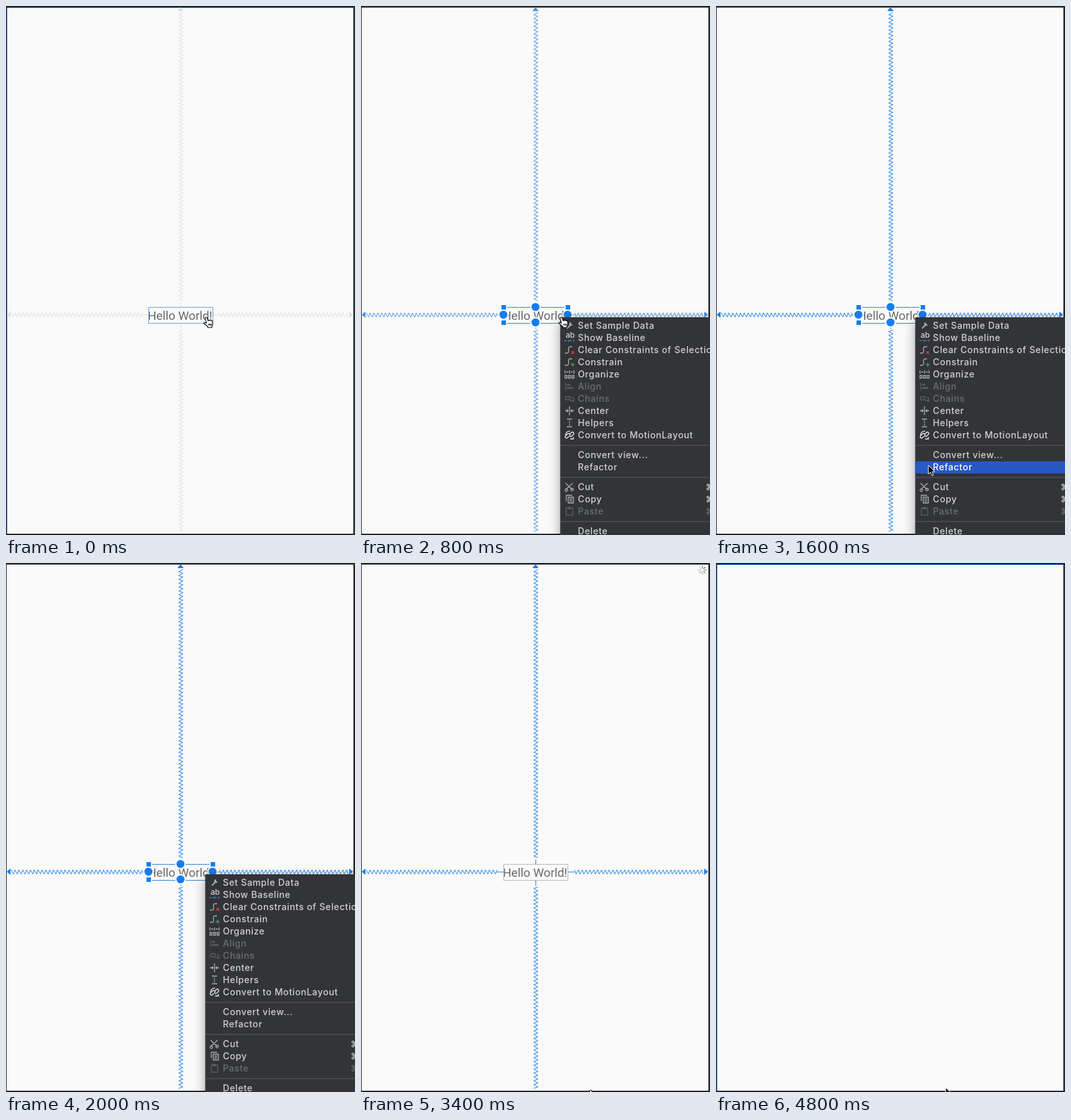
These frames come from a looping animation (544 by 826 pixels, 5 s). An HTML page:

```html
<!DOCTYPE html>
<html lang="en">
<head>
<meta charset="utf-8">
<title>Layout editor: delete a view</title>
<style>
  html, body { margin: 0; width: 100%; height: 100%; overflow: hidden; background: #242426; }
  svg { display: block; width: 544px; height: 826px; }
  .label { font: 18.67px Roboto, sans-serif; fill: #696969; }
  .item { font: 500 14px Inter, "DejaVu Sans", sans-serif; letter-spacing: .62px; fill: #d2d2d3; }
  .item path { fill: none; stroke: #adaeb0; stroke-width: 1.3; }
  .item .bar { fill: none; }
  .item.on .bar { fill: #2759c4; }
  .item.on { fill: #fff; }
  .item.off { fill: #6d6e70; }
  .item.off path { stroke: #5c5d60; }
  .menu { filter: drop-shadow(0 6px 9px rgba(0, 0, 0, .36)); }
</style>
</head>
<body>
<svg id="stage" viewBox="0 0 544 826"></svg>
<script>
const LOOP = 5000;
const BLUE = '#177cf2';
const stage = document.getElementById('stage');

function add(parent, tag, attrs = {}, text = '') {
  const el = document.createElementNS('http://www.w3.org/2000/svg', tag);
  for (const key in attrs) el.setAttribute(key, attrs[key]);
  el.textContent = text;
  parent.append(el);
  return el;
}
const group = (attrs, parent = stage) => add(parent, 'g', attrs);
const show = (el, on) => el.setAttribute('visibility', on ? 'visible' : 'hidden');

// Zigzag running outward from the view, starting on the given side of its axis.
function zigzag(from, to, mid, side, vertical) {
  const dir = Math.sign(to - from);
  const points = [];
  for (let i = 0; i * 3 <= Math.abs(to - from); i++) {
    const along = from + dir * (i * 3 - (i % 2 ? .7 : 0));
    const across = mid + 3.3 * (i % 2 ? -side : side);
    points.push(vertical ? [across, along] : [along, across]);
  }
  return 'M' + points.join('L');
}

// Canvas and its frame
add(stage, 'rect', { x: 1, y: 2.5, width: 540.5, height: 821.5, fill: '#fafafa' });
const frame = group({ 'stroke-width': 1 });
add(frame, 'path', { d: 'M1 2.5H542', stroke: '#1c6fc6' });
add(frame, 'path', { d: 'M1 2V824', stroke: '#0b2c7c', 'stroke-width': 1.4 });
add(frame, 'path', { d: 'M542 2V824', stroke: '#2b5560' });

// Constraint springs
const springs = group({});
add(springs, 'path', {
  d: zigzag(212, 8, 482.5, -1, false) + zigzag(333, 535, 482.5, -1, false) +
     zigzag(460, 8, 272.5, 1, true) + zigzag(506, 823, 272.5, 1, true) +
     'M212 482.5H222M323 482.5H333M272.5 463V470M272.5 496V504',
  fill: 'none', 'stroke-width': 1
});
add(springs, 'path', {
  d: 'M1 482l6-5v10zM541 482l-6-5v10zM272 2l-5 6h10z', stroke: 'none'
});

// View being edited
const view = group({});
add(view, 'rect', { x: 222, y: 470, width: 101, height: 26, fill: '#fafafa' });
add(view, 'text', { x: 221, y: 489.6, class: 'label' }, 'Hello World!');
const box = add(view, 'rect', {
  x: 222.5, y: 470.5, width: 100, height: 25, fill: 'none'
});

const handles = group({ fill: BLUE, stroke: '#fafafa', 'stroke-width': 2 });
for (const x of [222.5, 322.5])
  for (const y of [470.5, 494.5])
    add(handles, 'rect', { x: x - 4.5, y: y - 4.5, width: 9, height: 9 });
for (const [x, y] of [[222, 482], [322, 482], [272, 470], [272, 494]])
  add(handles, 'circle', { cx: x, cy: y, r: 7.2 });

// Context menu
const icons = {
  wrench: 'M-4 4.5L1.5-1M1-4.5L.5-1.5 1.5-.5 4.5-1M2-4.5L1-1.5',
  spline: 'M-7 5H-4C2 5-5-5 1-5H4',
  organize: 'M-7-6V-1M7-6V-1M0-6V-1M-5-3.5H-2M2-3.5H5M-7 2h3v4h-3zM-1.5 2h3v4h-3zM4 2h3v4h-3z',
  align: 'M-6-6V6M-4-3H1M-4-2H1M-4 3H6M-4 2H6',
  chains: 'M-1 2H-4A2.5 2.5 0 0 1-4-3H0A2.5 2.5 0 0 1 2 0M0-1A2.5 2.5 0 0 0 2 3H4A2.5 2.5 0 0 0 4-2M4 4H8',
  center: 'M0-7V7M-7 0H-2M2 0H7M-4-2L-2 0-4 2M4-2L2 0 4 2',
  helpers: 'M-4-6H4M-4 6H4M0-4V-2M0-1V1M0 2V4',
  convert: 'M-6 0A6 6 0 0 1 1-6M-1 2L-3 4A2 2 0 0 1-6 1L-3-2A2 2 0 0 1 0 1M0-1L3-4A2 2 0 0 1 6-1L3 2A2 2 0 0 1 0 1M1 6H6V3',
  cut: 'M-6-6L4 4M-6 4L5-6M-5 3a2 2 0 1 0 .1 0M4 2a2 2 0 1 0 .1 0',
  copy: 'M-5 3V-6H4M-2-3H6V6H-2zM0 0H4M0 3H4',
  paste: 'M-5-5H5V6H-5zM-2-6H2V-4H-2z'
};
const items = [
  [499, 'Set Sample Data', 'wrench'], [518, 'Show Baseline', 'baseline'],
  [537, 'Clear Constraints of Selection', 'spline', '#d9434e'],
  [556, 'Constrain', 'spline', '#4da253'], [575, 'Organize', 'organize'],
  [594, 'Align', 'align'], [613, 'Chains', 'chains'], [632, 'Center', 'center'],
  [651, 'Helpers', 'helpers'], [670, 'Convert to MotionLayout', 'convert'],
  [701, 'Convert view...'], [720, 'Refactor'],
  [751, 'Cut', 'cut'], [770, 'Copy', 'copy'], [789, 'Paste', 'paste'], [820, 'Delete']
];
const disabled = ['Align', 'Chains', 'Paste'];
const shortcuts = ['Cut', 'Copy', 'Paste'];

const menu = group({});
add(menu, 'rect', { x: 310.5, y: 486, width: 300, height: 400, fill: '#333437', class: 'menu' });
for (const y of [686, 736, 805])
  add(menu, 'path', { d: `M311 ${y}H544`, stroke: '#505154', 'stroke-width': 1.6 });

const rows = {};
for (const [y, name, icon, accent] of items) {
  const base = disabled.includes(name) ? 'item off' : 'item';
  const row = group({ class: base, transform: `translate(325 ${y})` }, menu);
  add(row, 'rect', { class: 'bar', x: -14.5, y: -9, width: 240, height: 19 });
  if (icon === 'baseline') {
    add(row, 'text', { x: -6, y: 0, style: 'font-size:12px;letter-spacing:0' }, 'ab');
    add(row, 'path', { d: 'M-8 4.5H-5M-3 4.5H3M5 4.5H8', style: 'stroke:#3e86c4' });
  } else if (icon) {
    const mark = add(row, 'path', { d: icons[icon] });
    if (icon === 'convert') mark.style.stroke = '#f0f0f0';
    if (icon === 'wrench') mark.style.strokeWidth = 2;
  }
  if (accent) {
    const cross = name === 'Constrain' ? 'M2 4H8M5 1V7' : 'M3 2L7 6M7 2L3 6';
    add(row, 'path', { d: cross, style: `stroke:${accent}` });
  }
  add(row, 'text', { x: 13, y: 5 }, name);
  if (shortcuts.includes(name)) add(row, 'text', { x: 212, y: 5 }, '⌘');
  rows[name] = { row, base };
}

// Busy spinner
const spinner = group({ 'stroke-width': 1.5, 'stroke-linecap': 'round' });
for (let i = 0; i < 8; i++)
  add(spinner, 'path', {
    d: 'M0-3V-6.2', transform: `rotate(${i * 45})`,
    stroke: `hsl(0 0% ${52 + i * 4}%)`
  });

// Pointers, hot spot at the origin
const cursors = {
  arrow: add(stage, 'path', {
    d: 'M0 0V14L3.2 11 5.5 16.2 7.9 15.2 5.7 10.2H10Z',
    fill: '#000', stroke: '#fff', 'stroke-width': 1
  }),
  hand: add(stage, 'path', {
    d: 'M-1.7 1.2Q0-1.2 1.5 1L3 5.5Q4.5 3.8 5.5 5.3 7 4 8 5.5 9.6 4.8 10 7L10.2 11Q10 13 9 14V16H2.5V14.5L-3.5 9.5Q-4 7.4-1.5 8.2L.4 9.2Z' +
       'M4.2 10V13M6.1 10V13M8 10V13',
    fill: '#fff', stroke: '#000', 'stroke-width': 1.1, 'stroke-linejoin': 'round'
  })
};

// Each step changes only what it names.
const steps = [
  [0, { spring: '#dfdfdf', frame: true, box: '#6a9fd6', view: true, handles: false,
        menu: false, row: '', spin: null, cursor: ['hand', 312, 486] }],
  [200, { spring: '#b6c9e2', frame: false, box: '#2d80dc', handles: true }],
  [400, { spring: '#80a6d6', menu: true }],
  [600, { spring: '#689edc' }],
  [800, { spring: '#4a93e3' }],
  [1000, { spring: '#3088ea', row: 'Show Baseline', cursor: ['arrow', 318, 512] }],
  [1200, { spring: '#1c7eec', row: 'Clear Constraints of Selection', cursor: ['arrow', 320, 533] }],
  [1400, { row: 'Helpers', cursor: ['arrow', 323, 646] }],
  [1600, { row: 'Refactor', cursor: ['arrow', 331, 717] }],
  [1800, { row: '', cursor: ['arrow', 346, 808] }],
  [2000, { cursor: ['', 0, 0] }],
  [2600, { row: 'Delete', cursor: ['arrow', 361, 823] }],
  [2800, { cursor: ['arrow', 357, 819] }],
  [3000, { cursor: ['arrow', 359, 820] }],
  [3400, { spring: '#1c80e6', box: '#b4b4b4', handles: false, menu: false, row: '',
           spin: 0, cursor: ['hand', 358, 823] }],
  [3600, { view: false, spin: 90 }],
  [3800, { spin: null }],
  [4600, { frame: true, cursor: ['arrow', 358, 822] }],
  [4800, { cursor: ['arrow', 358, 819] }]
];

function stateAt(time) {
  const state = {};
  for (const [start, change] of steps) if (start <= time) Object.assign(state, change);
  return state;
}

function draw(time) {
  const s = stateAt(time);
  show(frame, s.frame);
  show(springs, s.view);
  show(view, s.view);
  show(handles, s.handles);
  show(menu, s.menu);
  springs.setAttribute('stroke', s.spring);
  springs.setAttribute('fill', s.spring);
  box.setAttribute('stroke', s.box);
  for (const name in rows) {
    const { row, base } = rows[name];
    row.setAttribute('class', name === s.row ? 'item on' : base);
  }
  show(spinner, s.spin !== null);
  spinner.setAttribute('transform', `translate(532 11) rotate(${s.spin || 0})`);
  const [kind, x, y] = s.cursor;
  for (const name in cursors) {
    show(cursors[name], name === kind);
    cursors[name].setAttribute('transform', `translate(${x} ${y})`);
  }
}

const begin = performance.now();
function tick() {
  draw((performance.now() - begin) % LOOP);
  requestAnimationFrame(tick);
}
tick();
</script>
</body>
</html>
```
